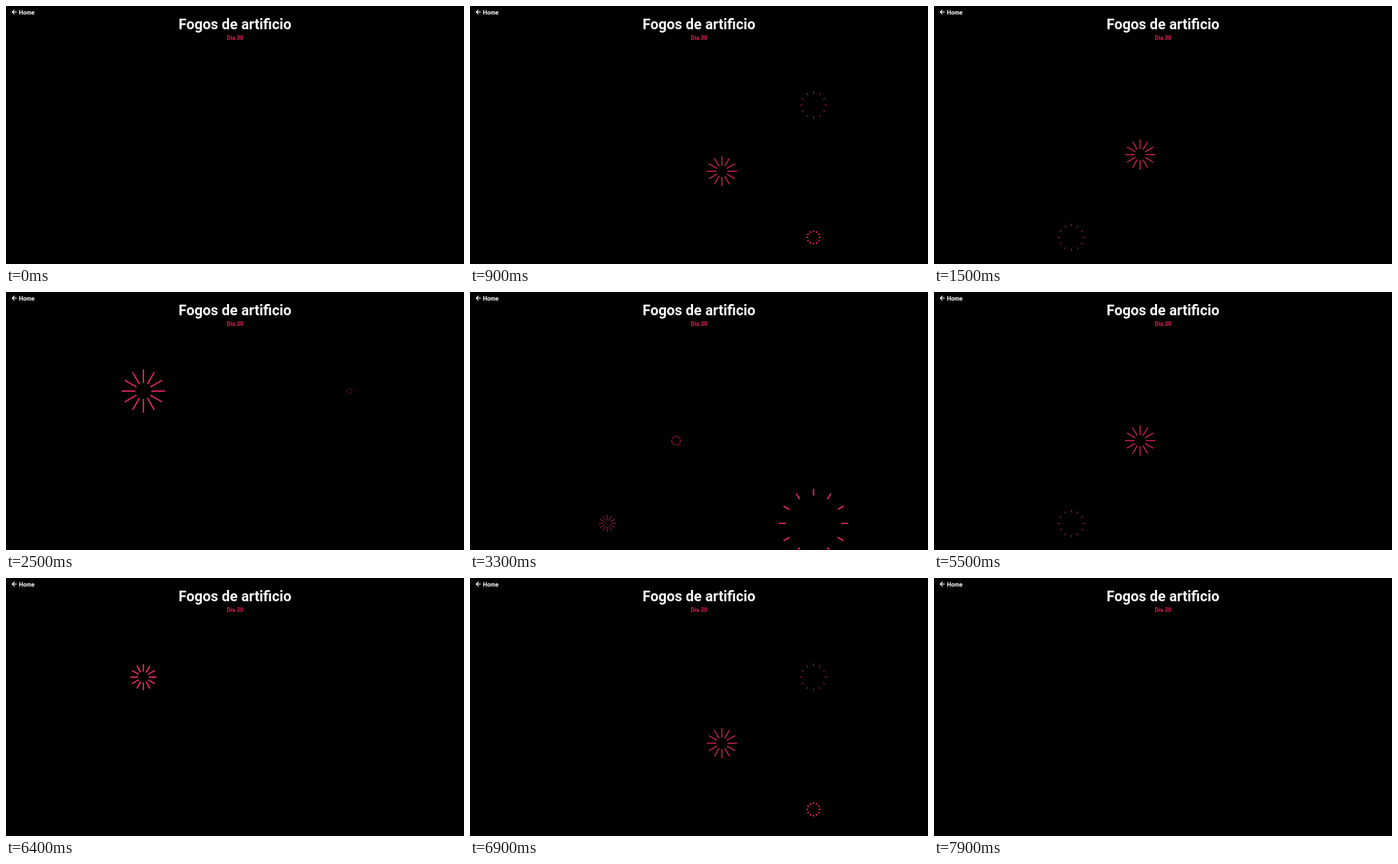
Animation of 690 by 388 pixels, one loop 8000 ms. Source, as an HTML page:

```html
<!DOCTYPE html>
<html lang="pt">
<head>
<meta charset="utf-8">
<title>Fogos de artificio</title>
<style>
  html, body { margin: 0; width: 100%; height: 100%; overflow: hidden; background: #000; }
  svg { display: block; width: 690px; height: 388px; }
  text { font-family: Roboto, sans-serif; font-weight: 700; font-size: 8.75px; fill: #fff; }
  .mid { text-anchor: middle; }
  .title { font-size: 21.65px; fill: #f7f5f8; }
  .day { fill: #e01e5a; }
  .arrow { fill: none; stroke: #fff; stroke-width: 1.25; }
  #sky { fill: none; stroke: #d92560; stroke-width: 2.1; }
</style>
</head>
<body>
<svg viewBox="0 0 690 388">
  <path class="arrow" d="M16.2 9.2H9.8M12.8 5.8L9.4 9.2L12.8 12.6"/>
  <text x="19.5" y="12.6">Home</text>
  <text class="mid title" x="345" y="35.4">Fogos de artificio</text>
  <text class="mid day" x="345" y="50.5">Dia 30</text>
  <g id="sky"></g>
</svg>
<script>
const PERIOD = 2000, STEP = 100, FIRST = 300, GAP = 200;
const RAYS = 12, MIN_R = 8.2, MAX_R = 53;

// burst centres in firing order, as percent of the stage width and y in px
const centres = [[30, 149], [75, 149], [55, 248.5], [75, 348], [30, 348], [45, 223.5]];
const scales = [1, 0.4, 0.7];

// radius that eases from MIN_R to MAX_R between two times
function radius(t, from, to) {
  const p = Math.min(1, Math.max(0, (t - from) / (to - from)));
  return MIN_R + (MAX_R - MIN_R) * (1 - Math.cos(p * Math.PI)) / 2;
}

function rays(t) {
  const outer = radius(t, -80, 450), inner = radius(t, 120, 540);
  if (outer === inner) return "";
  let d = "";
  for (let i = 0; i < RAYS; i++) {
    const a = i * 2 * Math.PI / RAYS, c = Math.cos(a), s = Math.sin(a);
    d += `M${c * inner} ${s * inner}L${c * outer} ${s * outer}`;
  }
  return d;
}

const sky = document.getElementById("sky");
const bursts = centres.map(([x, y], i) => {
  const el = document.createElementNS("http://www.w3.org/2000/svg", "path");
  const scale = scales[i % scales.length];
  el.setAttribute("transform", `translate(${x * 6.9} ${y}) scale(${scale})`);
  sky.append(el);
  return { el, start: FIRST + i * GAP };
});

function draw() {
  const t = Math.floor(performance.now() % PERIOD / STEP) * STEP;
  for (const { el, start } of bursts) el.setAttribute("d", rays(t - start));
  requestAnimationFrame(draw);
}
draw();
</script>
</body>
</html>
```
